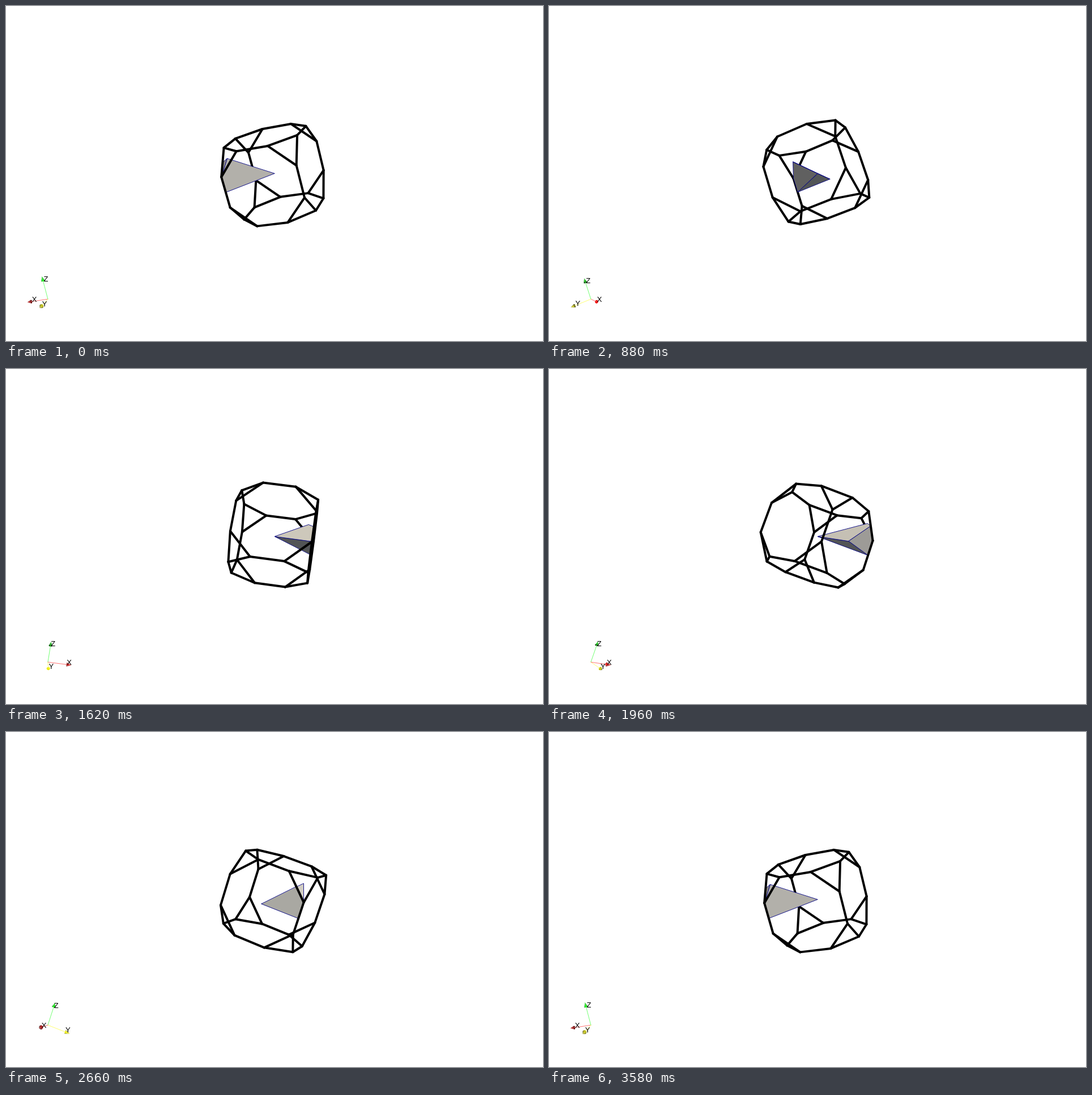
Recreate the animation shown at these times as an HTML page with a canvas. Size 948 px wide and 591 px high, loop 3.6 s.

```html
<!DOCTYPE html>
<html lang="en">
<head>
<meta charset="utf-8">
<title>Truncated cube orbit</title>
<style>
  html, body { margin: 0; width: 100%; height: 100%; overflow: hidden; background: #fff; }
  canvas { display: block; width: 948px; height: 591px; }
</style>
</head>
<body>
<canvas id="stage" width="948" height="591"></canvas>
<script>
const ctx = document.getElementById('stage').getContext('2d');
const XI = Math.SQRT2 - 1, H = Math.SQRT1_2, TAU = Math.PI * 2;
const STEP = 20, FRAMES = 180;
const START = -158.4 * Math.PI / 180;
const TILT = 0.026; // the camera sits slightly below the orbit plane

const dot = (a, b) => a[0] * b[0] + a[1] * b[1] + a[2] * b[2];
const cross = (a, b) => [
  a[1] * b[2] - a[2] * b[1], a[2] * b[0] - a[0] * b[2], a[0] * b[1] - a[1] * b[0]
];
const mix = (a, s, b, t) => a.map((v, i) => v * s + b[i] * t);
const unit = a => a.map(v => v / Math.hypot(...a));

// Orbit axis and the two horizontal directions of the orbit plane.
const up = unit([-0.13, -0.357, 0.925]);
const e1 = unit(mix([1, 0, 0], 1, up, -up[0]));
const e2 = cross(e1, up);

const solidLens = { x: 474, y: 295.5, f: 1102.8, d: 16.2 };
const axesLens = { x: 73.9, y: 517.1, f: 276.2, d: 6.69 };

// Truncated cube: vertices, face planes, edges.
const signs = [-1, 1];
const verts = [], planes = [], edges = [];
for (const a of signs) {
  for (let i = 0; i < 3; i++) {
    const n = [0, 0, 0];
    n[i] = a;
    planes.push({ n, off: 1 });
  }
  for (const b of signs) for (const c of signs) {
    planes.push({ n: [a, b, c], off: 2 + XI });
    verts.push([a * XI, b, c], [a, b * XI, c], [a, b, c * XI]);
  }
}
const onPlane = (p, v) => Math.abs(dot(p.n, v) - p.off) < 1e-6;
verts.forEach((p, i) => verts.slice(i + 1).forEach(q => {
  if (Math.abs(Math.hypot(...mix(p, 1, q, -1)) - 2 * XI) < 1e-6) {
    edges.push({ p, q, sides: planes.filter(s => onPlane(s, p) && onPlane(s, q)) });
  }
}));

// Fundamental cell: centre, face centre, edge middle, vertex and triangle points.
const t = (2 + XI) / 3;
const C = [0, 0, 0], F = [1, 0, 0], M = [1, 1, 0], V = [1, 1, XI], N = [1, H, H], T = [t, t, t];
const cell = [
  { n: [0, 0, -1], off: 0, pts: [C, F, M] },
  { n: [-H, H, 0], off: 0, pts: [C, M, V, T] },
  { n: [0, -H, H], off: 0, pts: [C, T, N, F] },
  { n: [1, 0, 0], off: 1, pts: [F, M, V, N] },
  { n: unit([1, 1, 1]), off: t * Math.sqrt(3), pts: [N, V, T] }
];

// Key, fill, head and two back lights in view space.
const lights = [
  { dir: [0.112, 0.766, 0.633], rgb: [0.75, 0.729, 0.677] },
  { dir: [0, -0.966, 0.259], rgb: [0.233, 0.243, 0.25] },
  { dir: [0, 0, 1], rgb: [0.25, 0.25, 0.25] },
  { dir: [0.94, 0, -0.342], rgb: [0.214, 0.214, 0.214] },
  { dir: [-0.94, 0, -0.342], rgb: [0.214, 0.214, 0.214] }
];
const css = c => `rgb(${c.map(v => Math.round(255 * Math.min(1, v))).join()})`;
const shade = n => css(lights.reduce(
  (sum, l) => mix(sum, 1, l.rgb, 0.985 * Math.max(0, dot(n, l.dir))), [0, 0, 0]));

const axes = [
  { name: 'X', dir: [1, 0, 0], rgb: [1, 0, 0] },
  { name: 'Y', dir: [0, 1, 0], rgb: [1, 1, 0] },
  { name: 'Z', dir: [0, 0, 1], rgb: [0, 1, 0] }
];

let view;
const look = v => view.map(row => dot(row, v));
const project = (v, lens) => {
  const [r, u, n] = look(v), s = lens.f / (lens.d - n);
  return [lens.x + r * s, lens.y - u * s];
};

function trace(pts, lens) {
  ctx.beginPath();
  pts.forEach(p => ctx.lineTo(...project(p, lens)));
}
function line(p, q, lens, color, width) {
  trace([p, q], lens);
  ctx.strokeStyle = color;
  ctx.lineWidth = width;
  ctx.stroke();
}
function fill(pts, lens, color) {
  trace(pts, lens);
  ctx.closePath();
  ctx.fillStyle = color;
  ctx.fill();
}

function drawSolid() {
  const eye = view[2].map(v => v * solidLens.d);
  const facing = s => dot(s.n, eye) > s.off;
  const drawEdges = near => edges
    .filter(e => e.sides.some(facing) === near)
    .forEach(e => line(e.p, e.q, solidLens, '#000', 4));
  drawEdges(false);
  for (const face of cell.filter(facing)) {
    fill(face.pts, solidLens, shade(look(face.n)));
    ctx.strokeStyle = '#000080';
    ctx.lineWidth = 0.9;
    ctx.stroke();
  }
  drawEdges(true);
}

function drawCone({ dir, rgb }) {
  const a = [dir[1], dir[2], dir[0]], b = cross(dir, a);
  const around = k => mix(a, Math.cos(k * TAU / 16), b, Math.sin(k * TAU / 16));
  const rim = k => mix(dir, 0.8, around(k), 0.08);
  const lit = n => css(rgb.map(v => v * Math.max(0, look(n)[2])));
  const eye = view[2].map(v => v * axesLens.d);
  for (let k = 0; k < 16; k++) {
    const n = unit(mix(dir, 0.4, around(k + 0.5), 1));
    if (dot(n, mix(eye, 1, dir, -1)) > 0) fill([dir, rim(k), rim(k + 1)], axesLens, lit(n));
  }
  if (dot(dir, eye) < 0.8) {
    fill([...Array(16).keys()].map(rim), axesLens, lit(dir.map(v => -v)));
  }
}

function drawAxes() {
  const sorted = [...axes].sort((p, q) => look(p.dir)[2] - look(q.dir)[2]);
  for (const axis of sorted) {
    const shaft = () => line(C, axis.dir.map(v => v * 0.8), axesLens,
      css(axis.rgb.map(v => v ? 1 : 0.45)), 1);
    const away = look(axis.dir)[2] < 0;
    if (!away) shaft();
    drawCone(axis);
    if (away) shaft();
  }
  ctx.fillStyle = '#000';
  ctx.font = '13px "Liberation Sans", Arial, sans-serif';
  for (const { name, dir } of axes) {
    const [x, y] = project(dir.map(v => v * 0.79), axesLens);
    ctx.fillText(name, x + 0.8, y + 0.7);
  }
}

function draw(now) {
  const step = Math.floor(now / STEP) % FRAMES;
  const phi = START + TAU * step / (FRAMES - 1);
  const c = Math.cos(phi), s = Math.sin(phi);
  const right = mix(e1, c, e2, -s), front = mix(e1, s, e2, c);
  const ct = Math.cos(TILT), st = Math.sin(TILT);
  view = [right, mix(up, ct, front, st), mix(front, ct, up, -st)];
  ctx.fillStyle = '#fff';
  ctx.fillRect(0, 0, 948, 591);
  ctx.lineCap = ctx.lineJoin = 'round';
  drawSolid();
  drawAxes();
}

let begin;
function tick(now) {
  begin ??= now;
  draw(now - begin);
  requestAnimationFrame(tick);
}
draw(0);
requestAnimationFrame(tick);
</script>
</body>
</html>
```
